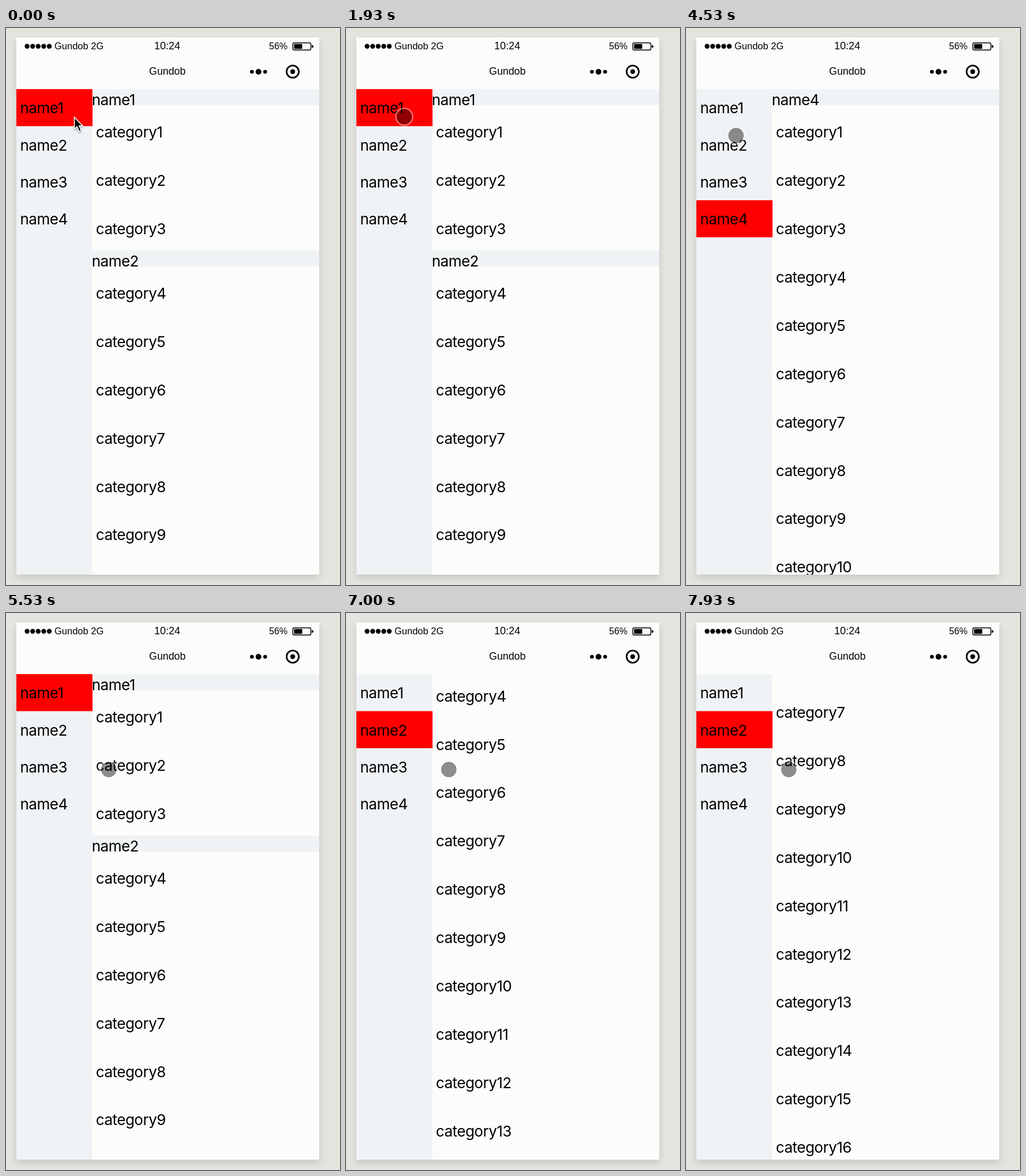
An HTML page for the animation above (8 s loop, 579 by 967 pixels).

```html
<!DOCTYPE html>
<html lang="en">
<head>
<meta charset="utf-8">
<title>Linked category list</title>
<style>
  html, body { margin: 0; width: 100%; height: 100%; overflow: hidden; background: #e6e4df; }
  svg { display: block; width: 579px; height: 967px; }
  .card { fill: #fcfcfb; filter: drop-shadow(0 6px 7px rgba(0, 0, 0, .13)); }
  .shade { fill: #f0f3f5; }
  .bar { font-family: "Liberation Sans", Arial, sans-serif; }
  .list { font: 26px Inter, sans-serif; letter-spacing: -.5px; }
  .arrow { filter: drop-shadow(0 2px 1.5px rgba(0, 0, 0, .35)); }
</style>
</head>
<body>
<svg viewBox="0 0 579 967">
  <clipPath id="panelClip"><rect x="149.5" y="106.3" width="393.5" height="842.7"/></clipPath>
  <rect class="card" x="18" y="16.5" width="525" height="932.5"/>

  <g class="bar">
    <g id="signal"></g>
    <text x="84" y="36.5" font-size="16.5">Gundob 2G</text>
    <text x="279.5" y="36.5" font-size="18" text-anchor="middle">10:24</text>
    <text x="456" y="36.5" font-size="16">56%</text>
    <text x="279.7" y="81" font-size="17.8" text-anchor="middle">Gundob</text>
  </g>
  <rect x="497.2" y="25.7" width="31.3" height="12.6" rx="2.5" fill="none" stroke="#000" stroke-width="1.4"/>
  <rect x="499.3" y="27.8" width="14.2" height="8.4" rx="1"/>
  <path d="M530 29.5q3 .5 3 2.5t-3 2.5z"/>
  <circle cx="426.3" cy="76" r="3.3"/>
  <circle cx="437.7" cy="76" r="5"/>
  <circle cx="449.2" cy="76" r="3.3"/>
  <circle cx="497" cy="75.7" r="10.6" fill="none" stroke="#000" stroke-width="2.8"/>
  <circle cx="497" cy="75.7" r="4.2"/>

  <rect class="shade" x="18" y="106.3" width="131.5" height="842.7"/>
  <rect id="active" x="18" width="132" height="64.3" fill="#f00"/>
  <g id="menu" class="list"></g>
  <g clip-path="url(#panelClip)"><g id="content" class="list"></g></g>

  <path id="arrow" class="arrow" d="M0 0V20.5L4.6 16.3L8.3 24.8L12 23.2L8.3 14.9H14.4Z"
        stroke="#fff" stroke-width="1.6"/>
  <g id="finger">
    <circle r="13.4" fill="#000" fill-opacity=".44"/>
    <circle r="14.6" fill="none" stroke="#fff" stroke-opacity=".42" stroke-width="2.4"/>
  </g>
</svg>
<script>
const LOOP = 8000, TOP = 106.3, ROW = 64.3, HEADER = 27.97, CELL = 83.9;
const sections = [[1, 3], [4, 16], [1, 3], [1, 16]];   // first and last category
const el = id => document.getElementById(id);

function add(parent, tag, attrs, text = '') {
  const node = document.createElementNS('http://www.w3.org/2000/svg', tag);
  for (const key in attrs) node.setAttribute(key, attrs[key]);
  node.textContent = text;
  parent.append(node);
}

for (let i = 0; i < 5; i++) add(el('signal'), 'circle', { cx: 36.6 + i * 9.6, cy: 31.7, r: 4.2 });

const offsets = [];
let y = TOP;
sections.forEach(([first, last], i) => {
  const name = 'name' + (i + 1);
  add(el('menu'), 'text', { x: 24.5, y: TOP + ROW * i + 42 }, name);
  offsets.push(y - TOP);
  add(el('content'), 'rect', { class: 'shade', x: 149.5, y, width: 393.5, height: HEADER });
  add(el('content'), 'text', { x: 148.7, y: y + 28 }, name);
  y += HEADER;
  for (let n = first; n <= last; n++, y += CELL)
    add(el('content'), 'text', { x: 155.8, y: y + 56 }, 'category' + n);
});

// Keys are [time, ...values]; a repeated time makes a jump.
const pointerKeys = [
  [0, 118.5, 155], [1500, 118.5, 155], [1900, 101, 154], [2050, 101, 154],
  [2400, 92, 206], [2600, 91, 208], [2950, 85, 268], [3300, 84, 274],
  [3530, 83, 304], [3800, 82, 334], [4100, 82, 334], [4650, 88, 146],
  [4950, 90, 146], [5400, 178.2, 271.7], [LOOP, 178.2, 271.7]
];
const scrollKeys = [
  [0, 0], [2500, 0], [2500, offsets[1]], [3100, offsets[1]],
  [3100, offsets[2]], [3950, offsets[2]], [3950, offsets[3]], [4800, offsets[3]],
  [4800, 0], [5560, 0], [6130, 176], [7000, 316], [7930, 539.5], [LOOP, 545]
];

function sample(keys, t) {
  const i = keys.findIndex(key => key[0] > t);
  const a = keys[i - 1], b = keys[i];
  const p = (t - a[0]) / (b[0] - a[0]);
  return a.slice(1).map((v, k) => v + (b[k + 1] - v) * p);
}

function draw() {
  const t = performance.now() % LOOP;
  const [px, py] = sample(pointerKeys, t);
  const [scroll] = sample(scrollKeys, t);
  const active = offsets.filter(offset => offset <= scroll + .5).length - 1;
  const touching = t >= 1500;

  el('content').setAttribute('transform', `translate(0 ${-scroll})`);
  el('active').setAttribute('y', TOP - .2 + ROW * active);
  for (const id of ['arrow', 'finger']) {
    el(id).setAttribute('transform', `translate(${px} ${py})`);
    el(id).setAttribute('visibility', (id === 'finger') === touching ? 'visible' : 'hidden');
  }
  requestAnimationFrame(draw);
}
draw();
</script>
</body>
</html>
```
